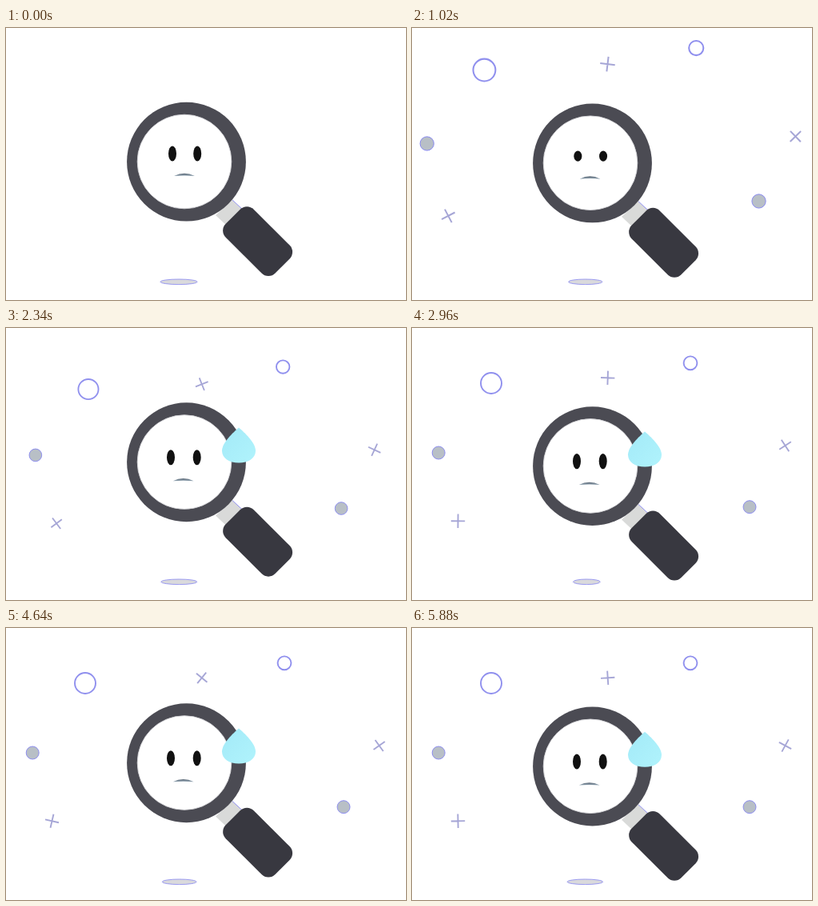
Recreate the animation shown at these times as an HTML page. Size 500 px wide and 340 px high, loop 5900 ms.

```html
<!DOCTYPE html>
<html lang="en">
<head>
<meta charset="utf-8">
<title>Searching magnifier</title>
<style>
  html, body { margin: 0; width: 100%; height: 100%; overflow: hidden; background: #fff; }
  svg { display: block; width: 100vw; height: 100vh; }
  .edge { stroke: #8686f2; }
  .ring { fill: none; stroke: #9090ee; stroke-width: 1.9; }
  .dot { fill: #b8bfc6; stroke-width: .9; }
  .cross { fill: none; stroke: #a6a6d6; stroke-width: 1.9; }
</style>
</head>
<body>
<svg viewBox="0 0 500 340">
  <defs>
    <linearGradient id="water" x1="0" y1="0" x2="1" y2="1">
      <stop offset="0" stop-color="#a3eaf8"/>
      <stop offset="1" stop-color="#b0f3fc"/>
    </linearGradient>
    <linearGradient id="lip" x1="0" y1="0" x2="0" y2="1">
      <stop offset="0" stop-color="#5f6b78"/>
      <stop offset="1" stop-color="#8fa3b2"/>
    </linearGradient>
  </defs>
  <ellipse id="shadow" class="edge" cy="317.3" ry="3.3" fill="#d9d9dc" stroke-width=".8"/>
  <g id="bits"></g>
  <g id="glass">
    <path d="M262 234 L283 215 L300 231 L279 250 Z" fill="#d9dad9"/>
    <path d="M283 215 L296 227" class="edge" stroke-width=".9"/>
    <rect x="-43.75" y="-24.75" width="87.5" height="49.5" rx="12" fill="#383840"
      transform="translate(314.6 266.6) rotate(45)"/>
    <circle cx="225.5" cy="167.2" r="74.4" fill="#4b4b53"/>
    <circle cx="223" cy="167" r="58.8" fill="#fff" stroke="#d6d6da" stroke-width=".9"/>
    <ellipse id="eyeL" rx="5" ry="9.6" fill="#111"/>
    <ellipse id="eyeR" rx="5" ry="9.6" fill="#111"/>
    <path id="mouth" d="M-13 1.7 Q0 -5 13 1.7 Q0 .6 -13 1.7 Z" fill="url(#lip)"/>
    <path id="drop" fill="url(#water)"
      d="M0 -22 C7 -16 21 -3 21 7 C21 16 12 22 0 22 C-12 22 -21 16 -21 7 C-21 -3 -7 -16 0 -22 Z"/>
  </g>
</svg>
<script>
const LOOP = 5900;
const $ = id => document.getElementById(id);

// Linear value at time t in a list of [time, value] steps.
function at(steps, t) {
  let prev = steps[0];
  for (const step of steps) {
    if (t < step[0]) {
      const part = (t - prev[0]) / (step[0] - prev[0] || 1);
      return prev[1] + (step[1] - prev[1]) * Math.max(0, part);
    }
    prev = step;
  }
  return prev[1];
}

const bob = [];
for (let i = 0; i < 10; i++) bob.push([i * 600, i % 2]);
const shade = [...bob, [5950, 0]];
const settle = [[780, 0], [1500, 1]];
const blink = [[840, 1], [950, .1], [1060, 1]];
const dropIn = [[1200, 0], [1812, 1]];

// Distance left to the resting place: 1 at launch, below 0 past it.
const far = [[50, 1], [900, -.125], [1500, .14], [2600, 0]];
const near = [[50, 1], [900, -.118], [1500, .073], [2660, 0]];

// Resting place, offset of the launch point, rotation at rest and turn per second.
const bits = [
  { kind: "ring", x: 99, y: 69, dx: 120, dy: 230, r: 13, path: far },
  { kind: "ring", x: 348, y: 43.8, dx: -91, dy: 236, r: 8.4, path: near },
  { kind: "dot", x: 33.2, y: 156, dx: 182, dy: 145, r: 8, path: near },
  { kind: "dot", x: 422, y: 223.7, dx: -145, dy: 91, r: 8, path: near },
  { kind: "cross", x: 244.7, y: 62.3, dx: 3, dy: 240, path: far, angle: 0, spin: 183 },
  { kind: "cross", x: 466.5, y: 147, dx: -180, dy: 160, path: far, angle: -187, spin: 52 },
  { kind: "cross", x: 57.5, y: 241.3, dx: 170, dy: 90, path: far, angle: 0, spin: 61 }
];

for (const b of bits) {
  const tag = b.kind === "cross" ? "path" : "circle";
  b.el = document.createElementNS("http://www.w3.org/2000/svg", tag);
  b.el.setAttribute("class", b.kind + (b.kind === "dot" ? " edge" : ""));
  if (tag === "path") b.el.setAttribute("d", "M-8.7 0 H8.7 M0 -8.7 V8.7");
  else b.el.setAttribute("r", b.r);
  $("bits").append(b.el);
}

function place(el, x, y, rest = "") {
  el.setAttribute("transform", `translate(${x} ${y}) ${rest}`);
}

function draw(t) {
  const low = at(shade, t);
  $("shadow").setAttribute("cx", 216 + 2.5 * low);
  $("shadow").setAttribute("rx", 23 - 6.5 * low);
  place($("glass"), 0, 5.8 * at(bob, t));

  const s = at(settle, t);
  const lid = `scale(1 ${at(blink, t)})`;
  place($("eyeL"), 208 - 2 * s, 157 + 4.2 * s, lid);
  place($("eyeR"), 239.2 - .5 * s, 157 + 4.2 * s, lid);
  place($("mouth"), 223 - 1.3 * s, 183.3 + 5.7 * s);

  const d = at(dropIn, t);
  place($("drop"), 291, 146, `scale(${d})`);
  $("drop").setAttribute("opacity", d);

  for (const b of bits) {
    const k = at(b.path, t);
    const turn = (b.angle || 0) + (b.spin || 0) * t / 1000;
    place(b.el, b.x + b.dx * k, b.y + b.dy * k, `rotate(${turn}) scale(${1 - k})`);
  }
}

const start = performance.now();
function tick() {
  draw((performance.now() - start) % LOOP);
  requestAnimationFrame(tick);
}
tick();
</script>
</body>
</html>
```
